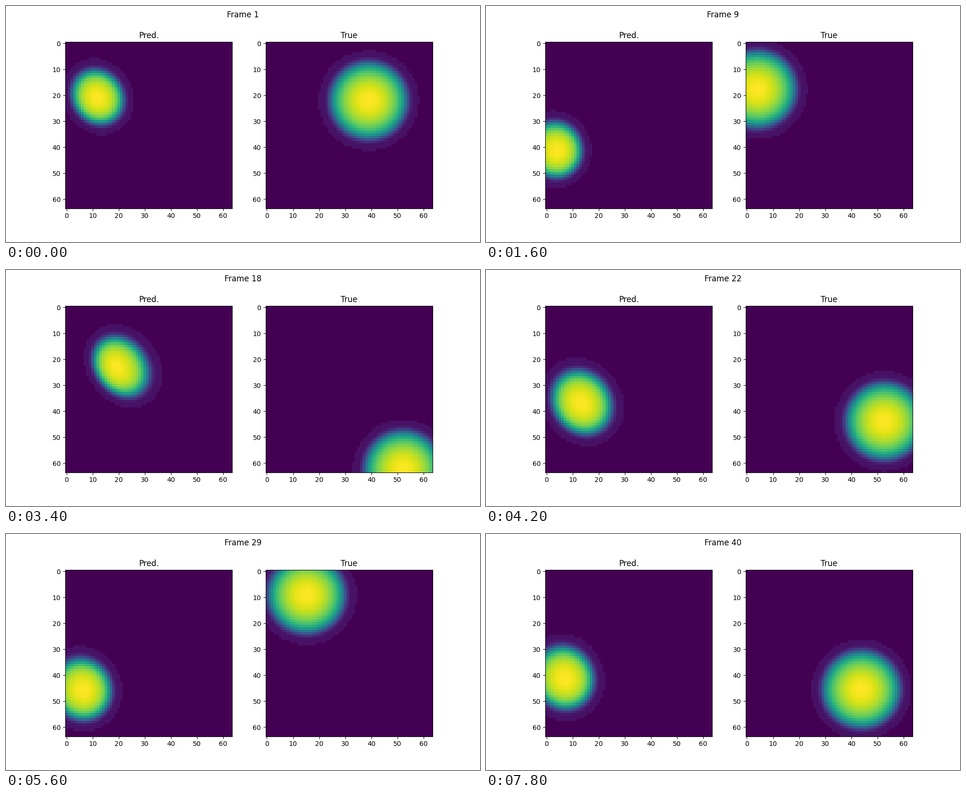
A matplotlib script for the animation above (8000 ms loop, 1000 px wide and 500 px high).

```python
import numpy as np
import matplotlib.pyplot as plt
from matplotlib.animation import FuncAnimation

SIZE = 64
FRAMES = 40
RADIUS = 19.2
plt.rcParams["font.family"] = "DejaVu Sans"

cols, rows = np.meshgrid(np.arange(SIZE), np.arange(SIZE))

# Turning points of the predicted ball: step, x, y, radius
POSES = np.array([
    (1, 12, 20.5, 14.2), (8, 4, 45.5, 14.4), (9, 3.2, 40.8, 14.4),
    (13, 13.7, 14.8, 14.6), (18, 21.6, 22.6, 15.5), (25, 7, 45.8, 16.8),
    (27, 6, 49, 16.5), (33, 6.5, 31, 15), (40, 6.5, 40.8, 16.3),
])


def brightness(rho, edge, blur, drop):
    """Domed disc with a soft edge and a faint flat halo out to rho = 1."""
    dome = np.clip(1 - drop * rho ** 2, 0, 1)
    glow = dome / (1 + np.exp((rho - edge) / blur))
    return np.where(rho < 1, np.maximum(glow, 0.05), 0)


def bounce(start, speed, t):
    """Position between two walls, by folding straight travel."""
    span = SIZE - 1
    p = (start + speed * t) % (2 * span)
    return span - abs(p - span)


def smooth(t, ts, vs):
    """Cubic Hermite curve through the points (ts, vs)."""
    slope = np.gradient(vs, ts)
    i = int(np.clip(np.searchsorted(ts, t) - 1, 0, len(ts) - 2))
    h = ts[i + 1] - ts[i]
    u = (t - ts[i]) / h
    return ((1 + 2 * u) * (1 - u) ** 2 * vs[i]
            + u * (1 - u) ** 2 * h * slope[i]
            + u * u * (3 - 2 * u) * vs[i + 1]
            + u * u * (u - 1) * h * slope[i + 1])


def true_ball(step):
    x = bounce(38.9, -5.35, step - 1)
    y = bounce(22, -4.96, step - 1)
    rho = np.hypot(cols - x, rows - y) / RADIUS
    return brightness(rho, edge=0.78, blur=0.057, drop=0.8)


def pred_ball(step):
    x, y, size = (smooth(step, POSES[:, 0], vs) for vs in POSES[:, 1:].T)
    skew = 0.01 * x

    def reach(cx, cy):
        u, v = (cols - cx) / (0.97 * size), (rows - cy) / (1.03 * size)
        return np.sqrt((u * u + v * v - 2 * skew * u * v) / (1 - skew ** 2))

    # The bright core lags behind as the ball moves right; the rim does not
    inner = np.clip(1 - reach(x, y), 0, 1)
    rho = reach(x + (1 - (x / 11) ** 2) * inner, y + 0.6 * inner)
    return brightness(rho, edge=0.72, blur=0.065, drop=0.65)


fig, axes = plt.subplots(1, 2, figsize=(10, 5), dpi=100)
title = fig.suptitle("Frame 1")
views = []
for ax, name, ball in zip(axes, ("Pred.", "True"), (pred_ball, true_ball)):
    ax.set_title(name)
    views.append((ax.imshow(ball(1), cmap="viridis", vmin=0, vmax=1), ball))


def draw(i):
    step = i + 1
    title.set_text(f"Frame {step}")
    for image, ball in views:
        image.set_data(ball(step))
    return [title] + [image for image, _ in views]


anim = FuncAnimation(fig, draw, frames=FRAMES, interval=200,
                     repeat=True, repeat_delay=0, blit=False)
plt.show()
```
